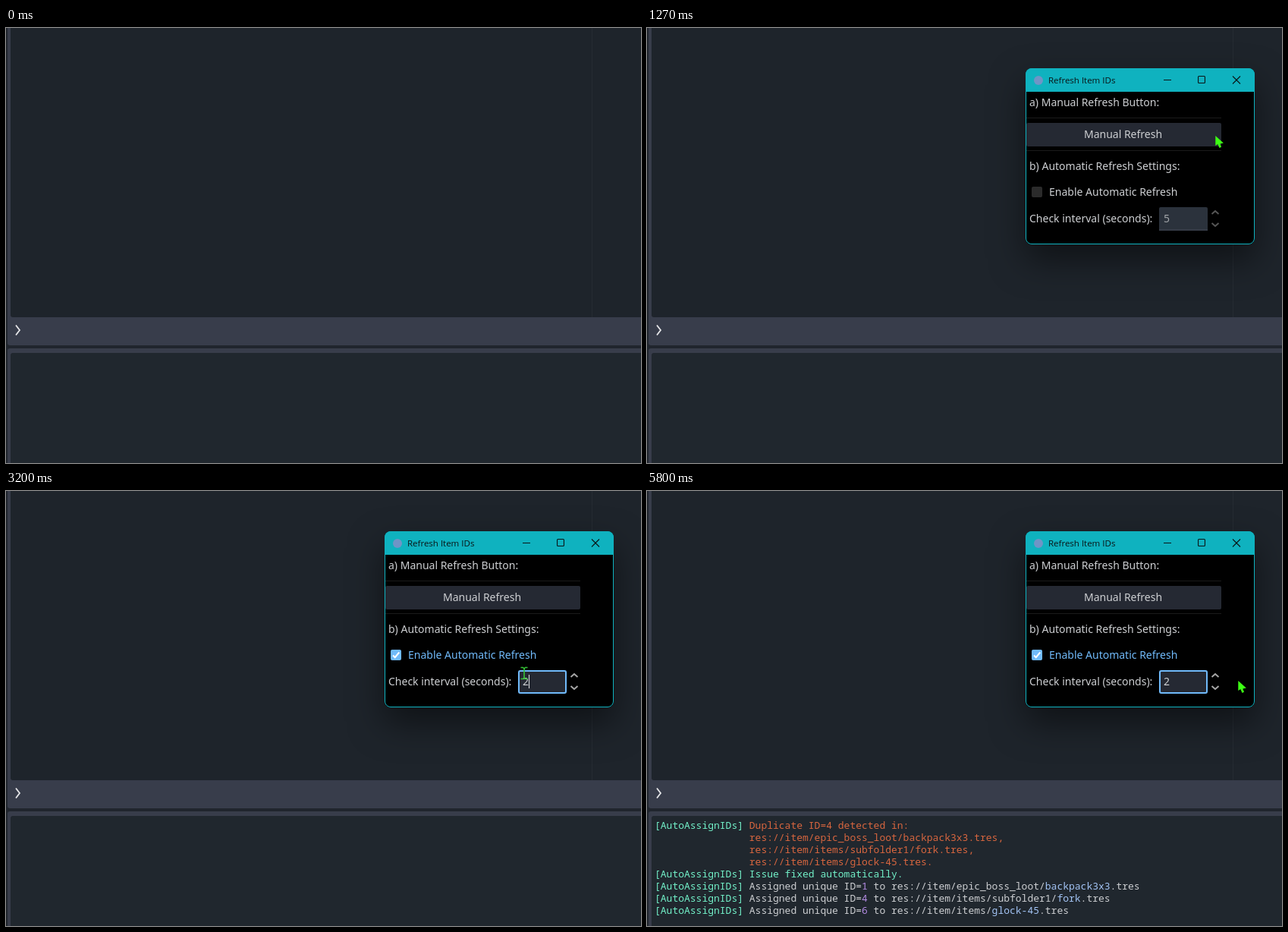
An HTML page with a canvas that plays this animation: 837x573 px, repeating every 8000 ms.

```html
<!DOCTYPE html>
<html lang="en">
<head>
<meta charset="utf-8">
<title>Refresh Item IDs</title>
<style>
html, body { margin: 0; width: 100%; height: 100%; overflow: hidden; background: #1e242b; }
canvas { display: block; }
</style>
</head>
<body>
<canvas id="stage" width="837" height="573"></canvas>
<script>
const ctx = document.getElementById('stage').getContext('2d');
const LOOP = 8000, FPS = 15;
const UI = '14px "Noto Sans", sans-serif';
const TITLE = '11.5px "Open Sans", sans-serif';
const MONO = '13px "Noto Sans Mono", monospace';
const BLUE = '#70bafa', TEAL = '#0fb2bf', TEXT = '#cdcfd2', FIELD = '#252933', PANEL = '#383d4b';

// Times below count ticks of 1/15 s.
const OPEN = 9, CONTENT = 12, HOVER = 28, PRESS = 31, CHECK = 32, FOCUS = 38, TYPED = 48, CARET_OFF = 58, LOG = 87;
const openScale = [0.93, 0.965, 0.99];
const pointerPath = [
  [19, 749, 142], [25, 620, 198], [27, 620, 198], [28, 620, 201], [29, 620, 205], [32, 620, 205],
  [38, 700, 246], [42, 683, 240], [49, 683, 240], [50, 700, 246], [51, 722, 252], [53, 722, 252],
  [58, 788, 259], [62, 780, 251], [64, 780, 251], [65, 779, 250]
];

const MINT = '#72f0c8', ORANGE = '#d8663f', PLAIN = '#cdcfd2', VIOLET = '#b48ce4', LINK = '#a3c4f5';
const TAG = '[AutoAssignIDs] ', INDENT = ' '.repeat(TAG.length);
const assigned = (id, folder, file) => [
  [TAG, MINT], ['Assigned unique ID=', PLAIN], [id, VIOLET],
  [' to res://item/' + folder, PLAIN], [file, LINK], ['.tres', PLAIN]
];
const logLines = [
  [[TAG, MINT], ['Duplicate ID=4 detected in:', ORANGE]],
  [[INDENT + 'res://item/epic_boss_loot/backpack3x3.tres,', ORANGE]],
  [[INDENT + 'res://item/items/subfolder1/fork.tres,', ORANGE]],
  [[INDENT + 'res://item/items/glock-45.tres.', ORANGE]],
  [[TAG, MINT], ['Issue fixed automatically.', MINT]],
  assigned('1', 'epic_boss_loot/', 'backpack3x3'),
  assigned('4', 'items/subfolder1/', 'fork'),
  assigned('6', 'items/', 'glock-45')
];

function rect(x, y, w, h, color, radius = 0) {
  ctx.fillStyle = color;
  ctx.beginPath();
  ctx.roundRect(x, y, w, h, radius);
  ctx.fill();
}

function frame(x, y, w, h, color, width, radius) {
  ctx.strokeStyle = color;
  ctx.lineWidth = width;
  ctx.beginPath();
  ctx.roundRect(x + width / 2, y + width / 2, w - width, h - width, radius);
  ctx.stroke();
}

function line(points, color, width) {
  ctx.strokeStyle = color;
  ctx.lineWidth = width;
  ctx.beginPath();
  points.forEach(([x, y]) => ctx.lineTo(x, y));
  ctx.stroke();
}

function text(str, x, y, font, color, align = 'left') {
  ctx.font = font;
  ctx.fillStyle = color;
  ctx.textAlign = align;
  ctx.fillText(str, x, y);
}

function drawEditor() {
  rect(0, 0, 837, 573, '#20252d');
  rect(2, -5, 840, 423, PANEL, 3);
  rect(6, -5, 840, 386, '#1e242b', 3);
  rect(772, 0, 1, 381, '#262c33');
  line([[13, 391.5], [18, 398], [13, 404.5]], '#e6e7e9', 1.8);
  rect(2, 422, 840, 160, PANEL, 3);
  rect(6, 428, 840, 160, '#20272e', 3);
}

function drawLog() {
  ctx.font = MONO;
  const advance = ctx.measureText('0').width;
  logLines.forEach((parts, row) => {
    let x = 10;
    for (const [str, color] of parts) {
      text(str, x, 445 + row * 16, MONO, color);
      x += str.length * advance;
    }
  });
}

function drawWindow(body) {
  ctx.save();
  ctx.shadowColor = 'rgba(0,0,0,0.5)';
  ctx.shadowBlur = 46;
  ctx.shadowOffsetY = 20;
  rect(499, 53, 302, 232, body, 8);
  ctx.restore();
  rect(499, 53, 302, 31, TEAL, [8, 8, 0, 0]);
  frame(499, 53, 302, 232, TEAL, 1, 7.5);
  ctx.fillStyle = '#6f95c6';
  ctx.beginPath();
  ctx.arc(516, 69, 6, 0, Math.PI * 2);
  ctx.fill();
  text('Refresh Item IDs', 529, 73, TITLE, '#0a1416');
  const ink = '#0a1416';
  line([[681, 68.5], [691, 68.5]], ink, 1);
  frame(726, 63, 10, 10, ink, 1.1, 1);
  line([[772, 63.5], [782, 73.5]], ink, 1.1);
  line([[782, 63.5], [772, 73.5]], ink, 1.1);
}

function drawCheckbox(tick) {
  const checked = tick >= CHECK;
  rect(507, 209, 14, 14, checked ? BLUE : '#2b2b2b', 2);
  if (checked) line([[510, 216.5], [512.7, 219.2], [518.3, 212.5]], '#fff', 2);
  const color = tick >= PRESS ? BLUE : tick >= HOVER ? '#f2f2f2' : TEXT;
  text('Enable Automatic Refresh', 530, 221, UI, color);
  if (tick >= PRESS && tick < FOCUS) frame(500, 201, 257, 31, BLUE, 2, 2);
}

function drawSpinBox(tick, pointer) {
  const enabled = tick >= CHECK, focused = tick >= FOCUS;
  text('Check interval (seconds):', 504, 256, UI, TEXT);
  rect(675, 236, 64, 31, enabled ? FIELD : '#2b323c', 2);
  if (focused) frame(675, 236, 64, 31, BLUE, 2, 2);
  else rect(675, 265, 64, 2, '#363c47');
  if (focused && tick < TYPED && pointer.x < 690) rect(681, 242, 8, 19, '#4a6480');
  text(tick >= TYPED ? '2' : '5', 681, 256, UI, enabled ? TEXT : '#a2a5a9');
  if (tick >= TYPED && tick < CARET_OFF) rect(689, 242, 1, 18, '#e0e2e5');
  const arrow = enabled ? '#a6a6a6' : '#565656';
  line([[744.5, 245], [749, 241], [753.5, 245]], arrow, 2);
  line([[744.5, 257], [749, 261], [753.5, 257]], arrow, 2);
}

function drawContent(tick, pointer) {
  text('a) Manual Refresh Button:', 504, 103, UI, TEXT);
  rect(500, 118, 257, 1, '#1b1b1b');
  rect(500, 125, 257, 31, FIELD, 2);
  text('Manual Refresh', 627.5, 145, UI, TEXT, 'center');
  rect(500, 161, 257, 1, '#1b1b1b');
  text('b) Automatic Refresh Settings:', 504, 187, UI, TEXT);
  drawCheckbox(tick);
  drawSpinBox(tick, pointer);
}

function pointerAt(tick) {
  const next = pointerPath.findIndex(p => p[0] > tick);
  if (next < 1) {
    const [, x, y] = pointerPath[next ? pointerPath.length - 1 : 0];
    return { x, y };
  }
  const [t0, x0, y0] = pointerPath[next - 1], [t1, x1, y1] = pointerPath[next];
  const u = (tick - t0) / (t1 - t0), k = u * u * (3 - 2 * u);
  return { x: Math.round(x0 + (x1 - x0) * k), y: Math.round(y0 + (y1 - y0) * k) };
}

function drawPointer({ x, y }) {
  ctx.save();
  ctx.translate(x, y);
  if (x >= 675 && x < 739 && y >= 236) {
    const green = '#35c435';
    line([[-4.5, -7.5], [-1.5, -7.5], [0, -6], [1.5, -7.5], [4.5, -7.5]], green, 1.3);
    line([[-4.5, 7.5], [-1.5, 7.5], [0, 6], [1.5, 7.5], [4.5, 7.5]], green, 1.3);
    line([[0, -6], [0, 6]], green, 1.6);
  } else {
    ctx.fillStyle = '#3dff14';
    ctx.beginPath();
    [[0.3, 0], [0.3, 13], [3.3, 11], [5.5, 16], [8, 14.8], [6.3, 10.4], [10.8, 9.6]]
      .forEach(([px, py]) => ctx.lineTo(px, py));
    ctx.fill();
  }
  ctx.restore();
}

function render(ms) {
  const tick = Math.floor((ms + 5) * FPS / 1000);
  const pointer = pointerAt(tick);
  drawEditor();
  if (tick >= LOG) drawLog();
  if (tick >= OPEN) {
    const scale = openScale[tick - OPEN] ?? 1;
    ctx.save();
    if (tick === OPEN) ctx.globalAlpha = 0.5;
    ctx.translate(581, 140);
    ctx.scale(scale, scale);
    ctx.translate(-581, -140);
    drawWindow(tick < CONTENT ? '#1e242b' : '#000');
    if (tick >= CONTENT) drawContent(tick, pointer);
    ctx.restore();
  }
  if (tick >= pointerPath[0][0]) drawPointer(pointer);
}

const start = performance.now();
function loop() {
  render((performance.now() - start) % LOOP);
  requestAnimationFrame(loop);
}
loop();
</script>
</body>
</html>
```
